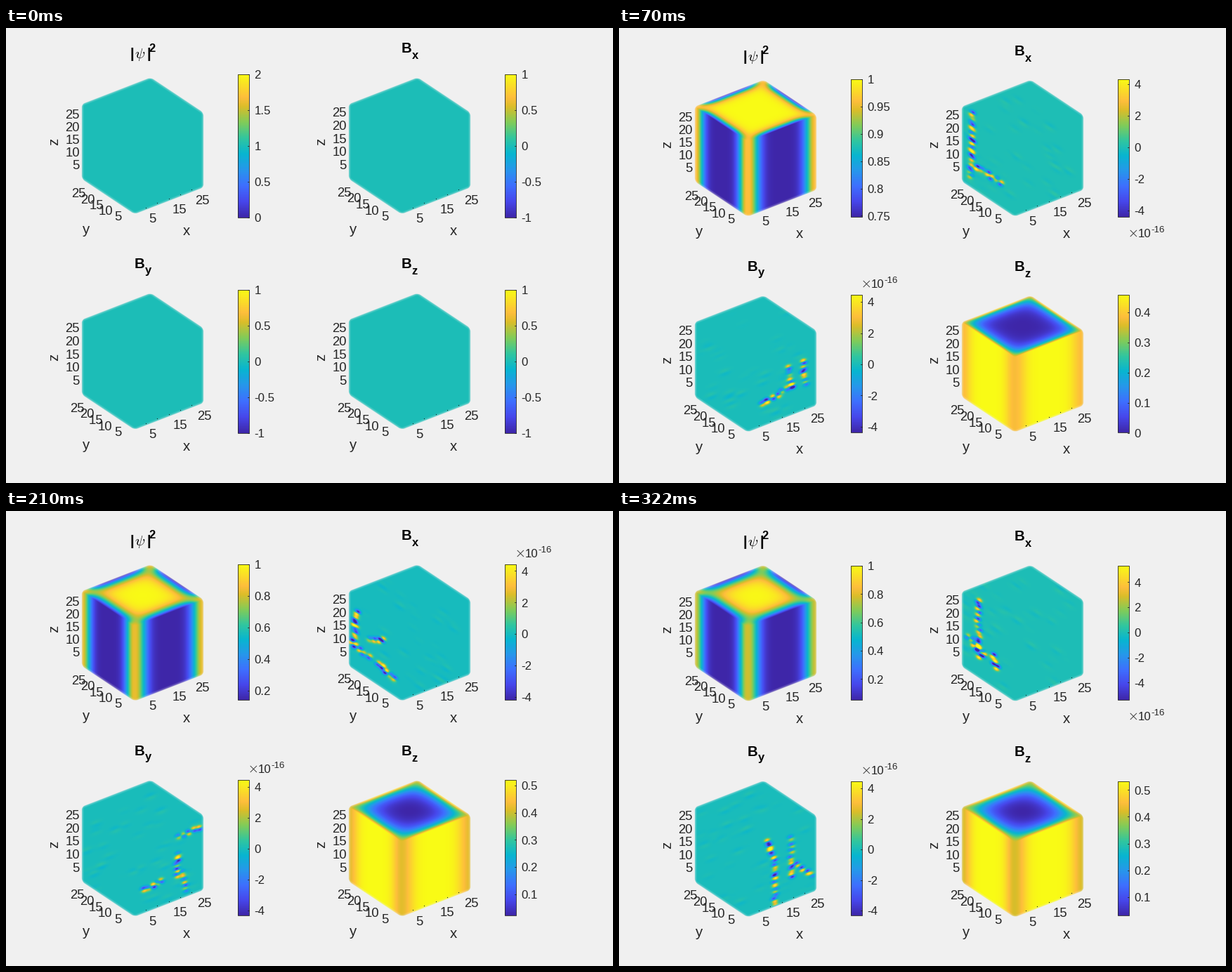
Animation of 864 by 648 pixels, one loop 0.35 s. Source, as a matplotlib script:

```python
import numpy as np
import matplotlib.pyplot as plt
from matplotlib.animation import FuncAnimation
from matplotlib.colors import LinearSegmentedColormap
from matplotlib.patches import Rectangle

W, H, DPI = 864, 648, 100
STEPS, INTERVAL = 5, 70
BG, INK = 240 / 255, "#262626"
PANELS = [(0, 0), (380, 0), (0, 307), (380, 307)]
SHIFT = [0, 3.5, 5, 5.7, 6.5]
BAR_TOP = [66, 73, 73, 76, 78]

plt.rcParams["font.family"] = "Liberation Sans"
plt.rcParams["mathtext.fontset"] = "cm"

HEX = "#3e26a8 #4747eb #3e6fff #2797eb #08b5d0 #31c69f #81cc59 #dcbd29 #febe3c #fcd030 #f9fb15".split()
STOPS = np.array([0, 7, 14, 21, 28, 35, 42, 49, 53, 56, 63]) / 63
PARULA = LinearSegmentedColormap.from_list("parula", list(zip(STOPS, HEX)), N=512)

# Colour limits of each panel after the first step
LIMITS = [
    [(.748, 1), (.368, 1), (.142, 1), (.052, 1)],
    [(-4.4, 4.31), (-3.7, 4.08), (-4.2, 4.42), (-5.37, 5.3)],
    [(-4.36, 4.45), (-2.18, 2.22), (-4.33, 4.45), (-4.32, 4.46)],
    [(.0025, .458), (.01, .5), (.022, .521), (.032, .532)],
]
POWER_BELOW = {(1, 1), (1, 4)}

# Rows of specks per step, as end points
SPECKS_X = [
    [(124, 122, 121, 212), (130, 199, 165, 220)],
    [(152, 146, 144, 200), (114, 198, 172, 221), (121, 207, 165, 230)],
    [(119, 144, 115, 190), (110, 187, 136, 207), (137, 183, 157, 183), (151, 217, 173, 238)],
    [(131, 129, 132, 206), (117, 178, 140, 206), (152, 207, 157, 224)],
]
SPECKS_Y = [
    [(262, 168, 265, 198), (240, 177, 246, 203), (246, 203, 205, 228)],
    [(225, 168, 224, 214), (256, 161, 256, 214), (204, 212, 240, 209), (205, 242, 222, 228)],
    [(245, 156, 276, 145), (245, 181, 243, 211), (197, 233, 221, 220), (251, 207, 255, 232)],
    [(212, 164, 222, 190), (222, 190, 222, 254), (245, 160, 245, 213), (255, 197, 274, 212)],
]

X0, X1, Y0, Y1 = 100, 290, 62, 280
SUB = 2
gx, gy = np.meshgrid(np.arange(X0 + .25, X1, 1 / SUB), np.arange(Y0 + .25, Y1, 1 / SUB))


def limits(panel, i):
    if i:
        return LIMITS[panel][i - 1]
    return (0, 2) if panel == 0 else (-1, 1)


def tick_step(lo, hi):
    """Smallest round step that gives at most six intervals."""
    for step in (.05, .1, .2, .5, 1, 2, 5):
        if (hi - lo) / step < 5.4:
            return step


def cube_coords(dy):
    """Depth coordinates u, v (0..1) of every visible surface point."""
    px, py = gx - 183, gy - (158.5 + dy)
    det = 98 * -50 - 75 * 38
    u = (px * -50 + 75 * py) / det
    v = (98 * py + 38 * px) / det
    top = (u >= 0) & (v >= 0)
    u = np.where(top, u, np.maximum(px / 98, 0))
    v = np.where(top, v, np.maximum(-px / 75, 0))
    return np.clip(u, 0, 1), np.clip(v, 0, 1)


def cube_alpha(dy):
    """Soft rounded hexagon."""
    front = np.array([183, 265 + dy])
    right, back, up = np.array([(98, -38), (-75, -50), (0, -106.5)])
    edges = [back, up, right, -back, -up, -right]
    r, total, a = 4, 0, front
    for edge in edges:
        tx, ty = edge / np.hypot(*edge)
        d = (gx - a[0]) * ty - (gy - a[1]) * tx
        total = total + np.maximum(d + r, 0) ** 2
        a = a + edge
    inside = r - np.sqrt(total)
    return np.clip(inside + .5, 0, 1) * np.clip(.6 + .13 * inside, 0, 1)


def both(f, t):
    return f(t) + f(1 - t)


def density(u, v, i):
    depth = [.07, .09, .11, .125][i - 1]
    corner = np.sqrt([.84, .83, .80, .76][i - 1])
    side = lambda t: corner * both(lambda s: np.exp(-(s / .165) ** 2), t)
    layer = lambda t: both(lambda s: np.exp(-(s / depth) ** 1.3), t)
    return (1 - (1 - side(v)) * layer(u)) * (1 - (1 - side(u)) * layer(v))


def axial(u, v, i):
    depth = [.08, .10, .11, .12][i - 1]
    dip = .15 + .02 * i
    core = lambda t: 1 - np.cosh((t - .5) / depth) / np.cosh(.5 / depth)
    bump = lambda t: both(lambda s: np.exp(-(s / .17) ** 2), t)
    low = 1 - core(.5) ** 2
    n = (1 - core(u) * core(v) - low) / (1 - low)
    return n * (1 - dip * bump(u) * bump(v))


def speckle(rows, slope, base, seed):
    rng = np.random.default_rng(seed)
    n = np.full(gx.shape, base)
    c, s = np.array(slope) / np.hypot(*slope)

    def add(x, y, amp, length, width):
        along = ((gx - x) * c + (gy - y) * s) / length
        across = ((gy - y) * c - (gx - x) * s) / width
        n[:] += amp * across * np.exp(-along ** 2 - across ** 2)

    for x0, y0, x1, y1 in rows:
        count = 2 + int(np.hypot(x1 - x0, y1 - y0) / 9)
        for t in np.linspace(0, 1, count):
            jx, jy = rng.uniform(-1.5, 1.5, 2)
            amp = rng.uniform(.4, 1.3) * rng.choice([-1, 1])
            add(x0 + t * (x1 - x0) + jx, y0 + t * (y1 - y0) + jy, amp, 4.2, 3)
    for _ in range(45):
        add(rng.uniform(112, 275), rng.uniform(95, 250), rng.uniform(-.07, .07), 8, 3.5)
    return n


def cube_image(panel, i):
    dy = SHIFT[i]
    lo, hi = limits(panel, i)
    if i == 0:
        n = np.full(gx.shape, .5)
    elif panel == 0:
        n = density(*cube_coords(dy), i)
    elif panel == 3:
        n = axial(*cube_coords(dy), i)
    else:
        rows, slope = [(SPECKS_X, (75, 50)), (SPECKS_Y, (98, -38))][panel - 1]
        n = speckle(rows[i - 1], slope, -lo / (hi - lo), 10 * panel + i)
    a = cube_alpha(dy)[..., None]
    rgb = PARULA(np.clip(n, 0, 1))[..., :3] * a + BG * (1 - a)
    h, w = Y1 - Y0, X1 - X0
    return rgb.reshape(h, SUB, w, SUB, 3).mean(axis=(1, 3))


IMAGES = [[cube_image(p, i) for p in range(4)] for i in range(STEPS)]

fig = plt.figure(figsize=(W / DPI, H / DPI), dpi=DPI, facecolor=(BG,) * 3)
ax = fig.add_axes([0, 0, 1, 1])


def write(x, y, text, px=18.5, ha="center", rise=.35, color=INK, **kw):
    """Text whose glyph middle, rise * px above the baseline, sits at y."""
    ax.text(x, y + rise * px, text, fontsize=px * 72 / DPI, ha=ha, va="baseline", color=color, **kw)


def draw_title(panel, ox, oy):
    bold = dict(color="black", weight="bold")
    if panel == 0:
        for x in (179, 203):
            write(ox + x, oy + 38, "|", 20.4, rise=.26, **bold)
        write(ox + 191, oy + 38, r"$\psi$", 21, rise=.25, color="black")
        write(ox + 208, oy + 28, "2", 16.5, **bold)
    else:
        write(ox + 189.5, oy + 28, "B", 20.4, **bold)
        write(ox + 202, oy + 40, "xyz"[panel - 1], 16.5, rise=.16 if panel == 2 else .26, **bold)


def draw_axes(panel, ox, oy):
    first = panel == 0
    z_top, z_step = (123, 18) if first else (120, 18.6)
    y_left, y_step = (114, 12.75) if first else (112, 13.25)
    y_high = 235 if first else 233.3
    x_step = 33 if first else 34.5
    for k in range(5):
        label = str(25 - 5 * k)
        write(ox + 105, oy + z_top + z_step * k, label, ha="right")
        write(ox + y_left + y_step * k, oy + y_high + (268 - y_high) / 4 * k, label, ha="right")
    for k, label in enumerate(("5", "15", "25")):
        write(ox + 203.5 + x_step * k, oy + 271 - 13 * k, label, ha="left")
    write(ox + 257, oy + 290, "x", 20.4, rise=.26)
    write(ox + 114, oy + 289, "y", 20.4, rise=.18)
    ax.text(ox + 74, oy + 162, "z", fontsize=20.4 * 72 / DPI, rotation=90, rotation_mode="anchor",
            ha="center", va="baseline", color=INK)


def draw_bar(panel, i, ox, oy):
    lo, hi = limits(panel, i)
    step = tick_step(lo, hi)
    top, bottom = oy + BAR_TOP[i], oy + (270 if i == 0 else 269)
    left, right = ox + 330, ox + 346
    ramp = np.linspace(1, 0, 256)[:, None]
    ax.imshow(ramp, cmap=PARULA, vmin=0, vmax=1, extent=(left, right, bottom, top),
              aspect="auto", interpolation="nearest")
    ax.add_patch(Rectangle((left, top), 16, bottom - top, fill=False, ec=INK, lw=.6))
    for k in range(int(np.ceil(lo / step - .05)), int(np.floor(hi / step + 1e-6)) + 1):
        y = bottom - (k * step - lo) / (hi - lo) * (bottom - top)
        ax.plot([right - 2.5, right], [y, y], color=INK, lw=.6)
        write(ox + 353.5, y + .5, f"{round(k * step, 4):g}", 16.7, ha="left")
    if i and panel in (1, 2):
        y = oy + 292 if (panel, i) in POWER_BELOW else top - 16
        for d in (-4.3, 4.3):
            ax.plot([ox + 348, ox + 356.6], [y - d + .5, y + d + .5], color=INK, lw=.6)
        write(ox + 359, y, "10", 16.7, ha="left")
        write(ox + 377, y - 6, "-16", 13.3, ha="left")


def draw(i):
    ax.clear()
    ax.axis("off")
    for panel, (ox, oy) in enumerate(PANELS):
        ax.imshow(IMAGES[i][panel], extent=(ox + X0, ox + X1, oy + Y1, oy + Y0),
                  aspect="auto", interpolation="nearest")
        low = oy + SHIFT[i]
        if panel or i == 0:
            xs = 199 + 16.3 * np.arange(5)
            ax.scatter(ox + xs, low + 262 - (xs - 183) * .388, s=.8, c="#102020", lw=0)
        draw_title(panel, ox, low)
        draw_axes(panel, ox, low)
        draw_bar(panel, i, ox, oy)
    ax.set_xlim(0, W)
    ax.set_ylim(H, 0)
    return []


anim = FuncAnimation(fig, draw, frames=STEPS, init_func=lambda: [], interval=INTERVAL,
                     repeat=True, repeat_delay=0, blit=False)
plt.show()
```
